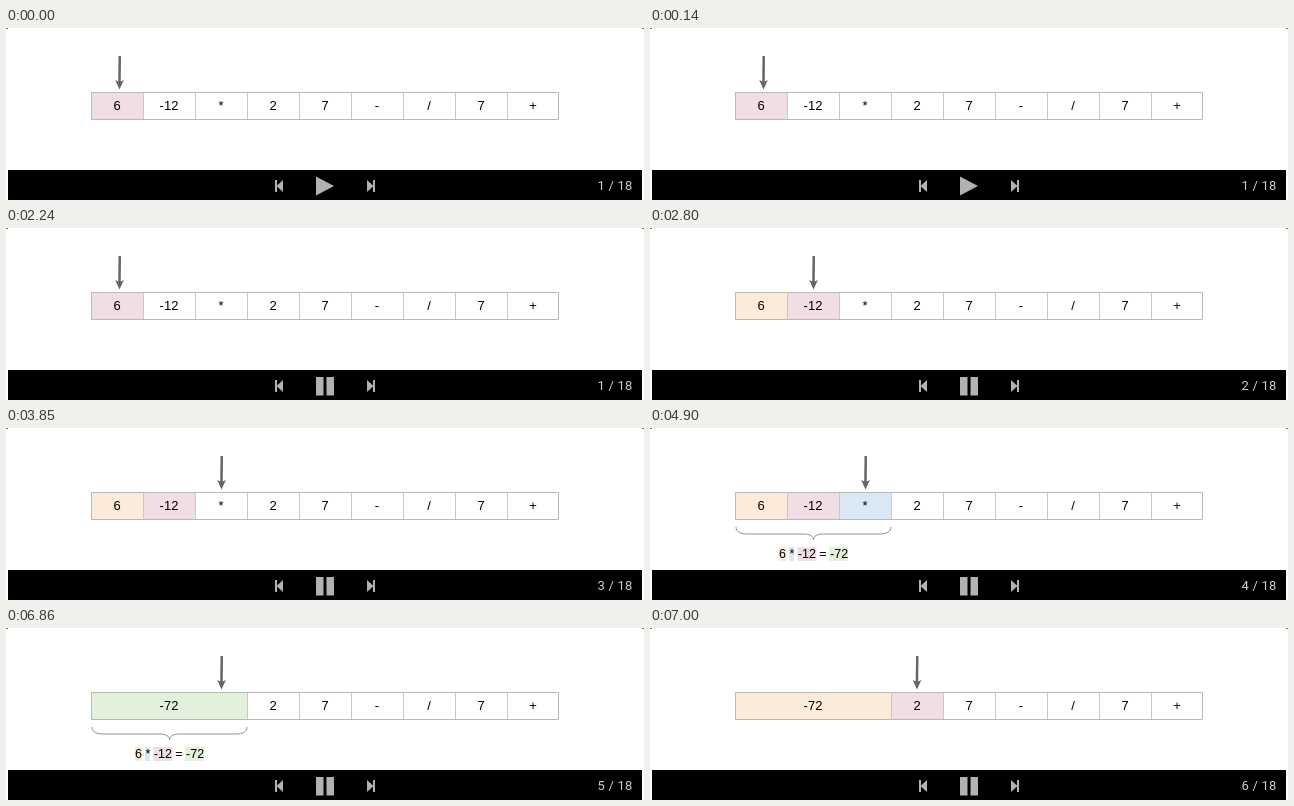
Write an HTML page that moves like this. It is 638 px wide and 172 px high and loops after 8 s.

```html
<!DOCTYPE html>
<html lang="en">
<head>
<meta charset="utf-8">
<style>
html, body { margin: 0; width: 100%; height: 100%; overflow: hidden; background: #fff; }
svg { display: block; }
.cell, .sum { font: 13px "Liberation Sans", Arial, sans-serif; fill: #000; }
.cell { text-anchor: middle; }
.sum { font-size: 12.5px; }
.count { font: 13px Roboto, sans-serif; letter-spacing: .2px; fill: #d0d0d0; text-anchor: end; }
</style>
</head>
<body>
<svg id="stage" width="638" height="172" viewBox="0 0 638 172"></svg>
<script>
const LOOP = 8000, LEFT = 85, TOP = 64, CELL = 52, HEIGHT = 28;
const PINK = '#f1dde4', ORANGE = '#fdebda', BLUE = '#dae8f6', GREEN = '#e3f0dc';
const ICON = '#b2b2b2', WHITE = '#fff';
const tokens = ['6', '-12', '*', '2', '7', '-', '/', '7', '+'];
const merged = ['-72', ...tokens.slice(3)];

const steps = [
  { at: 0, arrow: 113.5, fills: [PINK] },
  { at: 2800, arrow: 163.5, fills: [ORANGE, PINK] },
  { at: 3850, arrow: 215.5, fills: [ORANGE, PINK] },
  { at: 4900, arrow: 215.5, fills: [ORANGE, PINK, BLUE], sum: true },
  { at: 5950, arrow: 215.5, fills: [GREEN], sum: true, merged: true },
  { at: 7000, arrow: 267, fills: [ORANGE, PINK], merged: true }
];

const rect = (x, y, w, h, fill) =>
  `<rect x="${x}" y="${y}" width="${w}" height="${h}" fill="${fill}"/>`;
const path = (d, fill) => `<path d="${d}" fill="${fill}"/>`;
const line = (d, color) => `<path d="${d}" fill="none" stroke="${color}"/>`;
const text = (kind, x, y, s) => `<text class="${kind}" x="${x}" y="${y}">${s}</text>`;

function cells(step) {
  let x = LEFT, boxes = '', dividers = '', labels = '';
  (step.merged ? merged : tokens).forEach((label, i) => {
    const w = step.merged && i === 0 ? 3 * CELL : CELL;
    boxes += rect(x, TOP, w, HEIGHT, step.fills[i] || WHITE);
    if (i) dividers += line(`M${x + .5} ${TOP}v${HEIGHT}`, '#c8c8c8');
    labels += text('cell', x + w / 2, 82, label);
    x += w;
  });
  const frame = line(`M${LEFT + .5} ${TOP + .5}H${x - .5}v${HEIGHT - 1}H${LEFT + .5}z`, '#b8b8b8');
  return boxes + dividers + frame + labels;
}

function arrow(x) {
  return path(`M${x - 1} 28h2.5l-.3 27h-2.5z`, '#666') +
    path(`M${x} 61.5l-4.3 -9.5l4.3 2l4.3 -2z`, '#666');
}

function sum() {
  const brace = line('M86 99C86 104 91 106 97 106H153C160 106 163.5 108 163.5 112' +
    'C163.5 108 167 106 174 106H230C236 106 241 104 241 99', '#909090');
  const marks = rect(129, 119, 7.5, 14, ORANGE) + rect(139, 119, 5, 14, BLUE) +
    rect(147.5, 119, 19, 14, PINK) + rect(179, 119, 19, 14, GREEN);
  return brace + marks + text('sum', 129, 130, '6 * -12 = -72');
}

function controls(t, number) {
  const color = t >= 1330 && t < 2240 ? WHITE : ICON;
  const toggle = t < 1680
    ? path('M310 148.5L328 158L310 167.5z', color)
    : rect(310, 149, 7.5, 18.5, color) + rect(320.5, 149, 7.5, 18.5, color);
  return rect(2, 142, 634, 30, '#000') +
    rect(269, 152, 2, 12, ICON) + path('M277 152v12l-6.5 -6z', ICON) +
    toggle +
    path('M361 152v12l6.5 -6z', ICON) + rect(367, 152, 2, 12, ICON) +
    text('count', 626.5, 162, `${number} / 18`);
}

const stage = document.getElementById('stage');
let shown = '';

function draw(now) {
  const t = now % LOOP;
  const index = steps.findLastIndex(s => t >= s.at);
  const step = steps[index];
  const corners = rect(0, 0, 2, 1, '#777') + rect(636, 0, 2, 1, '#777');
  const picture = corners + cells(step) + arrow(step.arrow) +
    (step.sum ? sum() : '') + controls(t, index + 1);
  if (picture !== shown) stage.innerHTML = shown = picture;
  requestAnimationFrame(() => draw(performance.now()));
}
draw(performance.now());
</script>
</body>
</html>
```
